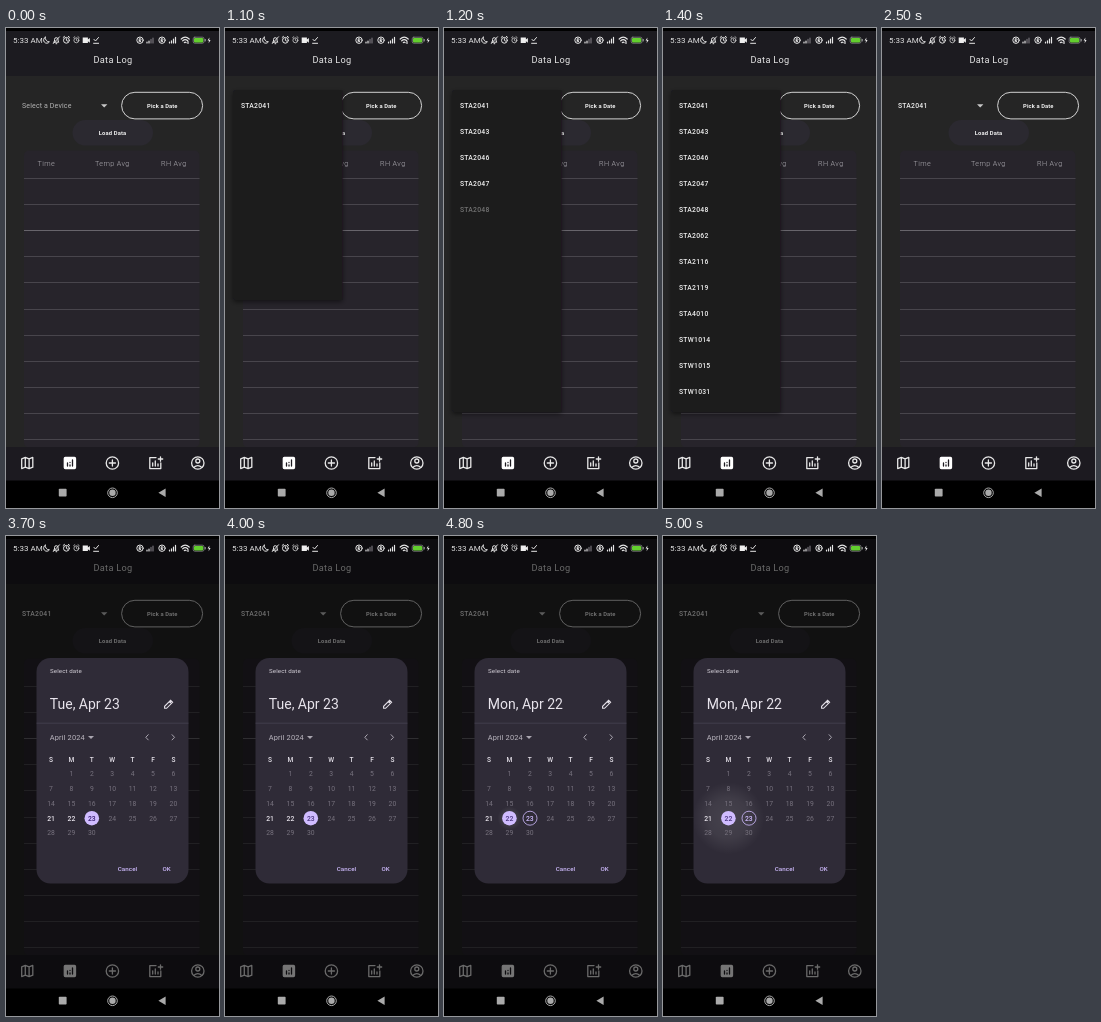
Animation of 213x480 px, one loop 5.1 s. Source, as an HTML page:

```html
<!DOCTYPE html>
<html lang="en">
<head>
<meta charset="utf-8">
<title>Data Log</title>
<style>
html, body { margin: 0; width: 100%; height: 100%; overflow: hidden; background: #000; }
svg { display: block; width: 100%; height: 100%; }
text { font-family: Roboto, Inter, sans-serif; white-space: pre; }
.icon { fill: none; stroke: #e8e8e8; stroke-width: 1.3; stroke-linejoin: round; stroke-linecap: round; }
.status { fill: none; stroke: #e6e6e6; stroke-width: 1; stroke-linejoin: round; stroke-linecap: round; }
.solid { fill: #eee; stroke: none; }
</style>
</head>
<body>
<svg viewBox="0 0 213 480" preserveAspectRatio="none">
  <defs>
    <radialGradient id="glow">
      <stop offset="0" stop-color="#fff" stop-opacity=".11"/>
      <stop offset=".55" stop-color="#fff" stop-opacity=".08"/>
      <stop offset="1" stop-color="#fff" stop-opacity="0"/>
    </radialGradient>
    <filter id="shadow" x="-15%" y="-10%" width="130%" height="125%">
      <feDropShadow dx="0" dy="2" stdDeviation="2.5" flood-color="#000" flood-opacity=".5"/>
    </filter>
    <clipPath id="sheet"><rect x="30.5" y="122" width="152" height="225.5" rx="14"/></clipPath>
  </defs>

  <g id="page">
    <rect width="213" height="480" fill="#252525"/>
    <rect width="213" height="48" fill="#1c1b20"/>
    <rect x="18" y="122.5" width="175.5" height="297" rx="5" fill="#27242b"/>
    <g id="rules"></g>
    <rect x="115.6" y="64.3" width="81" height="26.6" rx="13.3" fill="none" stroke="#e6e6e6" stroke-width=".9"/>
    <rect x="66.5" y="92" width="80.5" height="25.5" rx="12.7" fill="#2b2930"/>
    <path d="M95 76.3h6.4l-3.2 3.2z" fill="#c8c8c8"/>
    <rect y="419" width="213" height="34" fill="#1c1a20"/>
    <g class="icon">
      <path d="M15.7 430.8l3.6-1.4 3.8 1.4 3.7-1.4v9.8l-3.7 1.4-3.8-1.4-3.6 1.4zM19.3 429.4v9.8M23.1 430.8v9.8"/>
      <rect x="58.3" y="429.4" width="11.2" height="11.2" rx="1" fill="#fff" stroke="#fff"/>
      <path d="M61.5 438v-3M64 438v-1M64 434.5v0M66.5 438v-6" stroke="#1c1a20"/>
      <circle cx="106.4" cy="435" r="6.2"/><path d="M103.3 435h6.2M106.4 431.9v6.2"/>
      <path d="M150 429.6h-6.2v11h11v-5.6M146.7 438v-3.2M149.3 438v-5M152 438v-2M152.3 431h4.4M154.5 428.8v4.4"/>
      <circle cx="191.8" cy="435" r="6.2"/><circle cx="191.8" cy="433" r="2"/>
      <path d="M187.7 439.4q4.1-3.4 8.2 0"/>
    </g>
  </g>

  <g id="menu">
    <rect id="menuBox" x="8" y="62" width="109.6" rx="2" fill="#1b1a1f" filter="url(#shadow)"/>
  </g>

  <g id="dialog">
    <rect width="213" height="453" fill="#000" fill-opacity=".54"/>
    <rect x="30.5" y="122" width="152" height="225.5" rx="14" fill="#2f2b37"/>
    <path d="M30.5 187.2h152" stroke="#4a4653" stroke-width=".7"/>
    <path d="M158.6 172.3v-2l6-6 2 2-6 6zM163.4 165.5l2 2" fill="none" stroke="#e4e0e8" stroke-width="1.1"/>
    <path d="M82 200h6l-3 3z" fill="#aaa6b0"/>
    <path d="M142.5 198.4l-2.7 2.9 2.7 2.9M165.8 198.4l2.7 2.9-2.7 2.9" fill="none" stroke="#aaa6b0"/>
    <circle id="ripple" cx="65.4" cy="282.2" fill="url(#glow)" clip-path="url(#sheet)"/>
    <circle id="today" cx="86" cy="282.2" r="7" fill="none" stroke="#d0bcff" stroke-width=".8"/>
    <circle id="picked" cy="282.2" r="7.3" fill="#d0bcff"/>
  </g>

  <g id="system">
    <rect width="213" height="3" fill="#000"/>
    <rect y="452.5" width="213" height="27.5" fill="#000"/>
    <g fill="#aaa">
      <rect x="52.8" y="460.8" width="7.8" height="7.8" rx=".8"/>
      <circle cx="106.5" cy="464.8" r="4.8" fill="none" stroke="#aaa" stroke-width="1"/>
      <circle cx="106.5" cy="464.8" r="3.2"/>
      <path d="M159.6 460.6v8.4l-7.2-4.2z"/>
    </g>
    <g class="status">
      <path d="M39.2 9.2a3.2 3.2 0 1 0 4.2 4.6A4 4 0 0 1 39.2 9.2z"/>
      <path d="M47.8 14.2h5l-.7-1.2v-1.5a1.8 1.8 0 0 0-3.6 0V13zM47.3 15.5l6.2-6.7M50 15.7h.8"/>
      <path d="M57.2 9.4l1.3-1M63.6 9.4l-1.3-1M60.4 10.7v1.7l1.2.7"/><circle cx="60.4" cy="12.3" r="2.9"/>
      <g stroke-width=".7">
        <path d="M67.6 9.6l1.2-.9M73.2 9.6l-1.2-.9M70.4 10.9v1.5l1 .6"/><circle cx="70.4" cy="12.3" r="2.5"/>
      </g>
      <path class="solid" d="M76.7 9.6h5.2v1.8l2-1.5v4.8l-2-1.5v1.9h-5.2z"/>
      <path d="M88 11.4l1.5 1.6 3-3.5M87.6 15.3h5"/>
      <circle cx="134" cy="12.2" r="3.2"/><path d="M133.2 13.7v-3h1a.8 .8 0 0 1 0 1.7h-1l1.7 1.3"/>
      <circle cx="156" cy="12.2" r="3.2"/><path d="M155.2 13.7v-3h1a.8 .8 0 0 1 0 1.7h-1l1.7 1.3"/>
      <path d="M141 15v-1M143 15v-2M163.5 15v-1M165.5 15v-2.2M167.5 15v-4M169.5 15v-5.6" stroke-width="1.2"/>
      <path d="M145 15v-3.6M147 15v-5" stroke="#77757b" stroke-width="1.2"/>
      <path d="M175.2 11q4-3.6 8 0M176.7 12.8q2.5-2.2 5 0M178.3 14.6q.9-.8 1.8 0M182 13.4v2" stroke-width="1.2"/>
      <rect x="187.2" y="9.2" width="10.8" height="6" rx="1.6" stroke="#8a8a8a" stroke-width=".8"/>
      <rect x="188" y="10" width="9.2" height="4.4" rx="1" fill="#63cf2e" stroke="none"/>
      <path d="M199.2 11.4v1.6" stroke="#aaa"/>
      <path class="solid" d="M203.4 9.6l-1.8 3h1.4l-.4 2.6 2-3.3h-1.4z"/>
    </g>
  </g>
</svg>

<script>
const LOOP = 5100, STEP = 100;
const $ = id => document.getElementById(id);

function make(parent, tag, attrs) {
  const el = document.createElementNS('http://www.w3.org/2000/svg', tag);
  for (const key in attrs) el.setAttribute(key, attrs[key]);
  return parent.appendChild(el);
}

// x is the left edge, or the middle when anchor is "middle"; y is the visual centre.
function label(parent, x, y, size, str, { fill = '#f2f2f2', weight = 400, anchor = 'start', gap = 0 } = {}) {
  const el = make(parent, 'text', {
    x, y: y + size * .355, fill, 'font-size': size, 'font-weight': weight,
    'text-anchor': anchor, 'letter-spacing': gap
  });
  el.textContent = str;
  return el;
}

const page = $('page'), menu = $('menu'), dialog = $('dialog');

for (let i = 0; i < 11; i++) {
  const y = Math.round(150 + i * 26.1) + .5;
  make($('rules'), 'path', { d: `M18 ${y}h175.5`, stroke: i === 2 ? '#67646b' : '#48454c' });
}

label($('system'), 7, 12.2, 8, '5:33 AM', { fill: '#e6e6e6' });
label(page, 107, 32, 9.2, 'Data Log', { anchor: 'middle', fill: '#e6e6e6', gap: .3 });
const hint = label(page, 16, 77.5, 7, 'Select a Device', { fill: '#b4b4b4', gap: .15 });
const device = label(page, 16, 77.5, 6.8, 'STA2041', { weight: 500, gap: .25 });
label(page, 156.3, 77.6, 5.8, 'Pick a Date', { weight: 700, anchor: 'middle', gap: .1 });
label(page, 106.6, 104.8, 5.8, 'Load Data', { weight: 700, anchor: 'middle', gap: .15 });
[[31.5, 'Time'], [89, 'Temp Avg'], [155, 'RH Avg']].forEach(([x, str]) =>
  label(page, x, 135.6, 7.2, str, { fill: '#b4b2b8', weight: 300, gap: .4 }));

const stations = 'STA2041 STA2043 STA2046 STA2047 STA2048 STA2062 STA2116 STA2119 STA4010 STW1014 STW1015 STW1031'
  .split(' ')
  .map((name, i) => label(menu, 16, 77.5 + i * 26.05, 6.8, name, { weight: 500, gap: .25 }));

label(dialog, 44, 135, 6.2, 'Select date', { fill: '#d6d2da', gap: .1 });
const heading = label(dialog, 43.8, 168, 14, '', { fill: '#e8e4ec' });
label(dialog, 43.8, 201.3, 7.4, 'April 2024', { fill: '#bbb7c0', gap: .15 });
label(dialog, 121.5, 333.2, 6.2, 'Cancel', { fill: '#d0bcff', weight: 500, anchor: 'middle', gap: .1 });
label(dialog, 160.7, 333.2, 6.2, 'OK', { fill: '#d0bcff', weight: 500, anchor: 'middle', gap: .1 });

const column = i => 45 + i * 20.4;
[...'SMTWTFS'].forEach((name, i) =>
  label(dialog, column(i), 223.3, 6.6, name, { weight: 500, anchor: 'middle', fill: '#e8e4ec' }));
const days = {};
for (let day = 1; day <= 30; day++) {
  const enabled = day >= 21 && day <= 23;
  days[day] = label(dialog, column(day % 7), 238 + Math.floor(day / 7) * 14.75, 6.8, day, {
    anchor: 'middle', weight: enabled ? 500 : 400, fill: enabled ? '#e8e4ec' : '#77727e'
  });
}

const show = (el, on) => el.setAttribute('display', on ? 'inline' : 'none');
const clamp = v => Math.max(0, Math.min(1, v));

function drawMenu(t) {
  const step = (t - 1100) / STEP;
  $('menuBox').setAttribute('height', step < 1 ? 210 : 322);
  stations.forEach((el, i) => el.setAttribute('opacity', i ? clamp(step * 4.4 - i) : 1));
}

function drawDialog(t) {
  const monday = t >= 4800;
  heading.textContent = monday ? 'Mon, Apr 22' : 'Tue, Apr 23';
  $('picked').setAttribute('cx', column(monday ? 1 : 2));
  days[22].setAttribute('fill', monday ? '#4a3580' : '#e8e4ec');
  days[23].setAttribute('fill', monday ? '#d0bcff' : t < 3900 ? '#381e72' : '#4a3580');
  show($('today'), monday);
  $('ripple').setAttribute('r', monday ? 12 * (1 + (t - 4800) / STEP) : 0);
}

let last = -1;
function tick() {
  const t = Math.floor(performance.now() % LOOP / STEP) * STEP;
  if (t !== last) {
    last = t;
    const menuOpen = t >= 1100 && t < 2500, dialogOpen = t >= 3500;
    show(hint, t < 1100);
    show(device, t >= 2500);
    show(menu, menuOpen);
    show(dialog, dialogOpen);
    if (menuOpen) drawMenu(t);
    if (dialogOpen) drawDialog(t);
  }
  requestAnimationFrame(tick);
}
tick();
</script>
</body>
</html>
```
